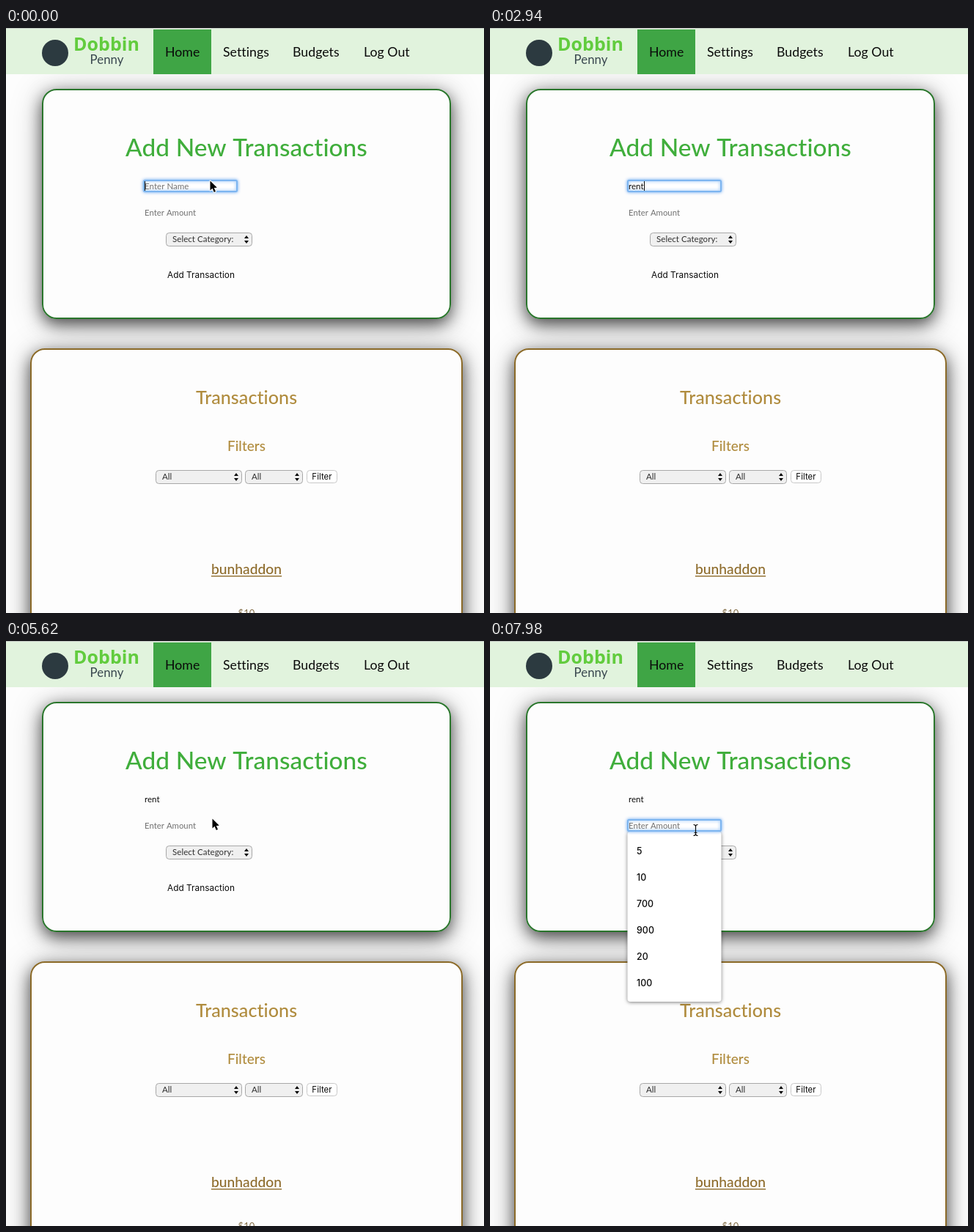
Animation of 652x798 px, one loop 8 s. Source, as an HTML page with a canvas:

```html
<!DOCTYPE html>
<html lang="en">
<head>
<meta charset="utf-8">
<title>Add New Transactions</title>
<style>
  html, body { margin: 0; width: 100%; height: 100%; overflow: hidden; background: #fdfdfd; }
  canvas { display: block; width: 652px; height: 798px; }
</style>
</head>
<body>
<canvas id="stage" width="652" height="798"></canvas>
<script>
const W = 652, H = 798, LOOP = 8000;
const ROUND = 'Lato, sans-serif';
const UI = 'Inter, sans-serif';
const PAPER = '#fdfdfd', HINT = '#717171', INK = '#0a0a0a', GOLD = '#b08c3e';

const stage = document.getElementById('stage').getContext('2d');
const page = document.createElement('canvas');
page.width = W;
page.height = H;
let g = page.getContext('2d');

function text(str, x, y, size, color, { font = ROUND, weight = 400, align = 'left' } = {}) {
  g.font = `${weight} ${size}px ${font}`;
  g.letterSpacing = '0.05px'; // keeps letters apart instead of joined as ligatures
  g.fillStyle = color;
  g.textAlign = align;
  g.fillText(str, x, y);
}

function box(x, y, w, h, r, fill, stroke, line = 1) {
  g.beginPath();
  g.roundRect(x, y, w, h, r);
  if (fill) { g.fillStyle = fill; g.fill(); }
  if (stroke) { g.strokeStyle = stroke; g.lineWidth = line; g.stroke(); }
}

function withShadow(color, blur, dy, draw) {
  g.save();
  g.shadowColor = color;
  g.shadowBlur = blur;
  g.shadowOffsetY = dy;
  draw();
  g.restore();
}

function poly(points, fill) {
  g.beginPath();
  points.forEach(([x, y]) => g.lineTo(x, y));
  g.closePath();
  g.fillStyle = fill;
  g.fill();
}

function card(x, y, w, h, border) {
  const base = () => box(x, y, w, h, 20, PAPER);
  withShadow('rgba(0, 0, 0, 0.2)', 48, 4, base);
  withShadow('rgba(0, 0, 0, 0.68)', 22, 7, base);
  box(x + 1, y + 1, w - 2, h - 2, 19, PAPER, border, 2);
}

function select(x, y, w, label) {
  box(x + 0.5, y + 0.5, w - 1, 18, 4, '#f0f0f0', '#a8a8a8');
  text(label, x + 9, y + 13, 11.5, '#303030');
  const ax = x + w - 8, ay = y + 9.5;
  poly([[ax - 3, ay - 1.5], [ax, ay - 5.5], [ax + 3, ay - 1.5]], INK);
  poly([[ax - 3, ay + 1.5], [ax, ay + 5.5], [ax + 3, ay + 1.5]], INK);
}

function drawPage() {
  g.fillStyle = PAPER;
  g.fillRect(0, 0, W, H);

  card(49, 83, 558, 314, '#2a762c');
  card(33, 437, 590, 420, '#8b6a28');

  g.fillStyle = '#e1f3dd';
  g.fillRect(0, 0, W, 63);
  g.fillStyle = '#c4cac4';
  g.fillRect(0, 0, W, 1);
  g.fillStyle = '#3fa545';
  g.fillRect(201, 2, 79, 61);

  g.beginPath();
  g.arc(67, 34, 18, 0, Math.PI * 2);
  g.fillStyle = '#2c3a40';
  g.fill();
  text('Dobbin', 92, 31, 25, '#62cc3e', { font: 'Open Sans, sans-serif', weight: 700 });
  text('Penny', 137.5, 49, 16.8, '#3a4850', { align: 'center' });

  [['Home', 217], ['Settings', 296], ['Budgets', 391], ['Log Out', 488]]
    .forEach(([label, x]) => text(label, x, 39, 17.7, INK));

  const heading = { align: 'center', weight: 500 };
  text('Add New Transactions', 328, 175, 33.4, '#40ae3c', heading);
  select(218, 279, 118, 'Select Category:');
  text('Add Transaction', 220, 341, 11.8, INK, { font: UI });

  text('Transactions', 328, 513, 25.1, GOLD, heading);
  text('Filters', 328, 577, 18.9, GOLD, heading);
  select(204, 603, 118, 'All');
  select(326, 603, 79, 'All');
  box(410.5, 603.5, 41, 17, 4, '#ffffff', '#c8c8c8');
  text('Filter', 431, 616, 11.4, INK, { font: UI, align: 'center' });

  text('bunhaddon', 328, 745, 19.2, '#8e6c2c', heading);
  const line = g.measureText('bunhaddon').width;
  g.fillRect(328 - line / 2, 747, line, 1.4);
  text('$10', 328, 803, 13, '#85704a', { align: 'center' });
}

function focusRing(y) {
  withShadow('rgba(80, 155, 240, 0.8)', 4, 0,
    () => box(188, y, 127, 15, 1.5, '#ffffff', '#7db5f0', 2));
}

function caret(x, y, age) {
  if (age % 1000 >= 500) return;
  g.fillStyle = INK;
  g.fillRect(x, y, 1, 13);
}

function suggestions() {
  withShadow('rgba(0, 0, 0, 0.5)', 5, 1,
    () => box(187.5, 260, 128, 232, 4, '#ffffff'));
  ['5', '10', '700', '900', '20', '100'].forEach((n, i) =>
    text(n, 200, 291 + i * 36, 12.4, INK, { font: UI, weight: 500 }));
}

function arrow(x, y) {
  g.save();
  g.translate(x, y);
  g.beginPath();
  [[0.5, 0.5], [0.5, 13.5], [3.5, 10.8], [5.8, 16], [8, 15], [5.8, 10], [9.8, 9.8]]
    .forEach(([px, py]) => g.lineTo(px, py));
  g.closePath();
  g.lineJoin = 'round';
  g.lineWidth = 2;
  g.strokeStyle = '#ffffff';
  g.stroke();
  g.fillStyle = '#000000';
  g.fill();
  g.restore();
}

function beam(x, y) {
  g.beginPath();
  g.moveTo(x - 3, y - 7.5);
  g.quadraticCurveTo(x, y - 7.5, x, y - 5);
  g.quadraticCurveTo(x, y - 7.5, x + 3, y - 7.5);
  g.moveTo(x, y - 5);
  g.lineTo(x, y + 5);
  g.moveTo(x - 3, y + 7.5);
  g.quadraticCurveTo(x, y + 7.5, x, y + 5);
  g.quadraticCurveTo(x, y + 7.5, x + 3, y + 7.5);
  g.moveTo(x - 2, y + 3.5);
  g.lineTo(x + 2, y + 3.5);
  g.strokeStyle = INK;
  g.lineWidth = 1.2;
  g.stroke();
}

// Pointer stops: [time, x, y]
const PATH = [
  [0, 278, 208], [3300, 279, 212], [3660, 283, 226], [4200, 281, 242],
  [5900, 281, 242], [6100, 282, 249], [7300, 282, 249], [7700, 280, 258]
];
const KEYS = [1000, 1560, 2200, 2640];
const HIDE = 1000, SHOW = 3300, BLUR = 4600, FOCUS = 6000;

function pointer(t) {
  const i = PATH.findIndex(p => p[0] > t);
  if (i < 0) return PATH[PATH.length - 1].slice(1);
  const [a, b] = [PATH[i - 1], PATH[i]];
  const k = (t - a[0]) / (b[0] - a[0]);
  const s = k * k * (3 - 2 * k);
  return [1, 2].map(n => a[n] + (b[n] - a[n]) * s);
}

function draw(t) {
  g.drawImage(page, 0, 0);

  const typed = KEYS.filter(k => k <= t);
  const name = 'rent'.slice(0, typed.length);
  const amountFocused = t >= FOCUS;

  if (t < BLUR) focusRing(208);
  text(name || 'Enter Name', 189, 220, 11.5, name ? INK : HINT);
  if (t < BLUR) {
    const end = name ? g.measureText(name).width : -0.5;
    caret(Math.round(189 + end), 209, t - (typed[typed.length - 1] || 0));
  }

  if (amountFocused) {
    suggestions();
    focusRing(244);
  }
  text('Enter Amount', 189, 256, 11.3, HINT);
  if (amountFocused) caret(189, 245, t - FOCUS);

  const [x, y] = pointer(t);
  if (amountFocused) beam(x + 0.5, y);
  else if (t < HIDE || t >= SHOW) arrow(x, y);
}

drawPage();
g = stage;
const start = performance.now();
function tick() {
  draw((performance.now() - start) % LOOP);
  requestAnimationFrame(tick);
}
tick();
</script>
</body>
</html>
```
